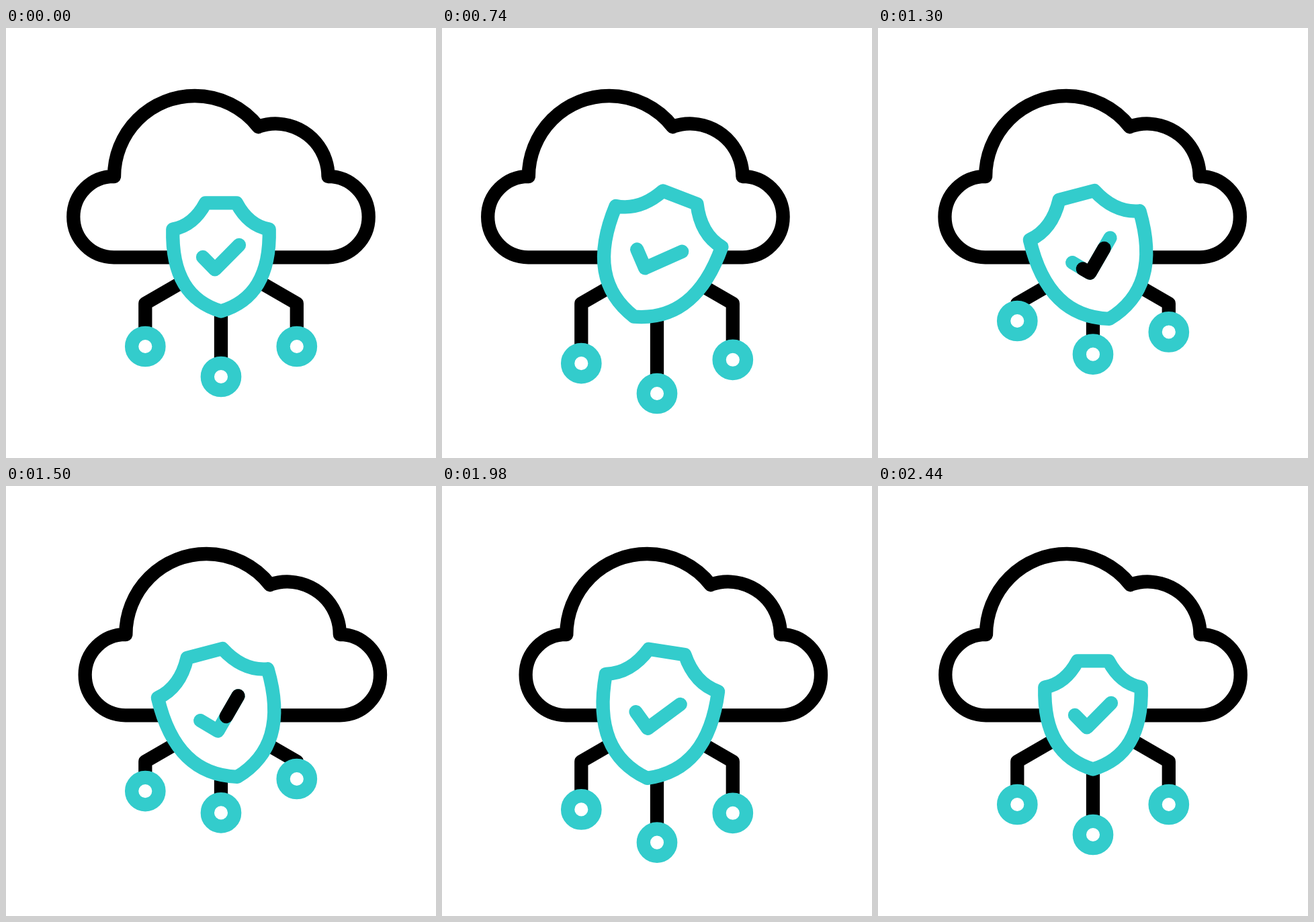
An HTML page with a canvas that plays this animation: 640 by 640 pixels, repeating every 3 s.

```html
<!DOCTYPE html>
<html lang="en">
<head>
<meta charset="utf-8">
<title>Cloud security</title>
<style>
  html, body { margin: 0; width: 100%; height: 100%; overflow: hidden; background: #fff; }
  canvas { display: block; width: 640px; height: 640px; }
</style>
</head>
<body>
<canvas id="stage" width="640" height="640"></canvas>
<script>
const ctx = document.getElementById('stage').getContext('2d');
const LOOP = 3000;
const LINE = 20.3;
const BLACK = '#000';
const TEAL = '#33cccc';
const PIVOT = { x: 320, y: 340.75 };

// Keyframes: [time in ms, value], eased in and out between neighbours.
const CLOUD_X = [[200, 0], [800, -33], [1800, 31.1], [2400, 0]];
const NODE_Y = [[200, 0], [700, 26], [1300, -38], [1800, 13], [2200, 0]];
const TILT = [[200, 0], [800, 21.7], [1400, -17.6], [1900, 9.5], [2400, 0]];
const GROW = [[200, 1], [600, 1.18], [2000, 1.18], [2400, 1]];
const TRIM_END = [[800, 0], [1500, 1]];
const TRIM_START = [[1100, 0], [1800, 1]];

const NODES = [
  { x: 207.3, y: 474, delay: 0, bend: 1 },
  { x: 320, y: 519, delay: 100, bend: 0 },
  { x: 432.8, y: 474, delay: 200, bend: -1 }
];

const CHECK = [[293, 341], [311, 359.3], [347, 323]];

function valueAt(keys, t) {
  if (t <= keys[0][0]) return keys[0][1];
  for (let i = 1; i < keys.length; i++) {
    const [t0, a] = keys[i - 1];
    const [t1, b] = keys[i];
    if (t < t1) {
      const u = (t - t0) / (t1 - t0);
      return a + (b - a) * u * u * (3 - 2 * u);
    }
  }
  return keys[keys.length - 1][1];
}

function stroke(color) {
  ctx.strokeStyle = color;
  ctx.stroke();
}

function polyline(points) {
  ctx.beginPath();
  points.forEach(([x, y]) => ctx.lineTo(x, y));
}

function drawCloud(dx) {
  ctx.save();
  ctx.translate(dx, 0);
  ctx.beginPath();
  ctx.moveTo(479.5, 341.3);
  ctx.lineTo(160.5, 341.3);
  ctx.arc(160.5, 281.1, 60.2, Math.PI / 2, Math.PI * 1.5);
  ctx.arc(281, 221, 120, Math.PI, Math.atan2(-74, 95));
  ctx.arc(401, 221, 78.5, Math.atan2(-74, -25), 0);
  ctx.arc(479.5, 281.1, 60.2, -Math.PI / 2, Math.PI / 2);
  ctx.closePath();
  stroke(BLACK);
  ctx.restore();
}

function drawNode(node, t) {
  const y = node.y + valueAt(NODE_Y, t - node.delay);
  const top = node.bend
    ? [[node.x + node.bend * 72.7, 368], [node.x, 410]]
    : [[node.x, 400]];
  ctx.lineCap = 'butt';
  polyline([...top, [node.x, y - 20]]);
  stroke(BLACK);
  ctx.beginPath();
  ctx.arc(node.x, y, 20.2, 0, Math.PI * 2);
  ctx.fill();
  stroke(TEAL);
}

function shieldPath(at) {
  ctx.beginPath();
  ctx.moveTo(...at(297, 260.3));
  ctx.lineTo(...at(343, 260.3));
  ctx.quadraticCurveTo(...at(361, 294.3), ...at(391.7, 299.6));
  ctx.bezierCurveTo(...at(393.5, 368), ...at(368.5, 407), ...at(320, 421.5));
  ctx.bezierCurveTo(...at(271.5, 407), ...at(246.5, 368), ...at(248.3, 299.6));
  ctx.quadraticCurveTo(...at(279, 294.3), ...at(297, 260.3));
  ctx.closePath();
}

// The part of a two-segment line between fractions a and b of its length.
function trim([p, q, r], a, b) {
  const first = Math.hypot(q[0] - p[0], q[1] - p[1]);
  const corner = first / (first + Math.hypot(r[0] - q[0], r[1] - q[1]));
  const mix = (m, n, u) => [m[0] + (n[0] - m[0]) * u, m[1] + (n[1] - m[1]) * u];
  const point = f => f < corner
    ? mix(p, q, f / corner)
    : mix(q, r, (f - corner) / (1 - corner));
  return a < corner && b > corner ? [point(a), q, point(b)] : [point(a), point(b)];
}

function drawShield(t) {
  const angle = valueAt(TILT, t) * Math.PI / 180;
  const scale = valueAt(GROW, t);
  const c = Math.cos(angle) * scale;
  const s = Math.sin(angle) * scale;
  // Points are transformed by hand so the line weight stays constant.
  const at = (x, y) => {
    const dx = x - PIVOT.x, dy = y - PIVOT.y;
    return [PIVOT.x + dx * c - dy * s, PIVOT.y + dx * s + dy * c];
  };
  shieldPath(at);
  ctx.fill();
  stroke(TEAL);

  const check = CHECK.map(([x, y]) => at(x, y));
  ctx.lineCap = 'round';
  polyline(check);
  stroke(TEAL);
  const a = valueAt(TRIM_START, t);
  const b = valueAt(TRIM_END, t);
  if (b > a) {
    polyline(trim(check, a, b));
    stroke(BLACK);
  }
}

function draw(t) {
  ctx.fillStyle = '#fff';
  ctx.fillRect(0, 0, 640, 640);
  ctx.lineWidth = LINE;
  ctx.lineJoin = 'round';
  drawCloud(valueAt(CLOUD_X, t));
  NODES.forEach(node => drawNode(node, t));
  drawShield(t);
}

const start = performance.now();
function tick(now) {
  draw(Math.max(0, now - start) % LOOP);
  requestAnimationFrame(tick);
}
draw(0);
requestAnimationFrame(tick);
</script>
</body>
</html>
```
